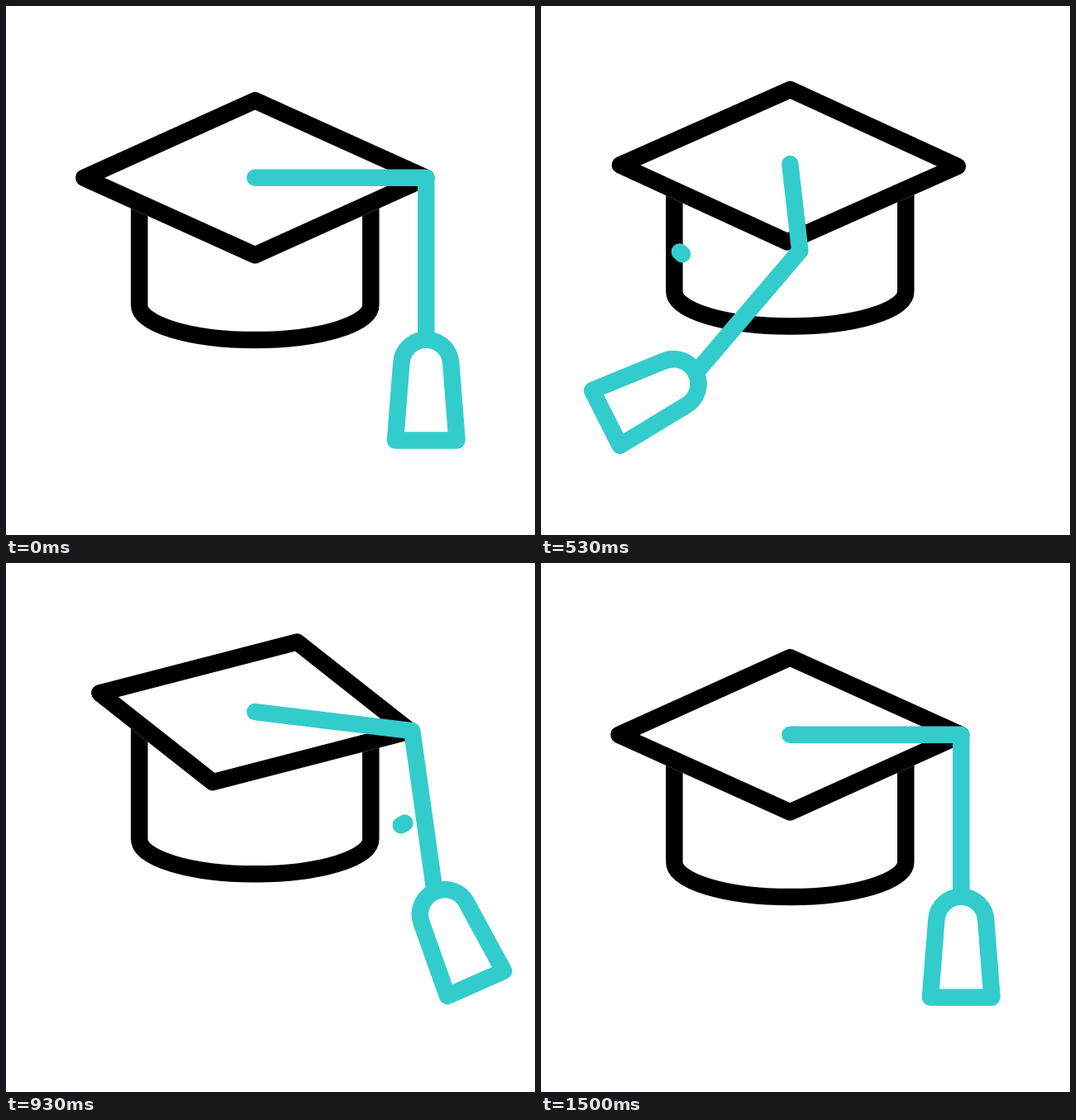
An HTML page with a canvas for the animation above (1670 ms loop, 640x640 px).

```html
<!DOCTYPE html>
<html lang="en">
<head>
<meta charset="utf-8">
<title>Graduation cap</title>
<style>
  html, body { margin: 0; height: 100%; overflow: hidden; background: #fff; }
  canvas { display: block; width: 640px; height: 640px; }
</style>
</head>
<body>
<canvas id="stage" width="640" height="640"></canvas>
<script>
const ctx = document.getElementById('stage').getContext('2d');
const LOOP = 1670, FPS = 30, RAD = Math.PI / 180;
const TEAL = '#33cccc', CX = 301.3, CY = 207.8, RX = 207, RY = 93.5;

// Key times in ticks of 1/30 s, shared by all swinging parts
const TIMES = [0, 5, 11, 16, 23, 28, 32];
const TRACKS = {
  cos:    [1, .83, .384, -.008, .63, .907, 1],
  sin:    [0, .353, .86, .986, .735, .246, 0],
  shift:  [0, 0, 1.2, 2, .8, .3, 0],
  hookX:  [207, 184, 78, 12, 137, 190, 207],
  hookY:  [0, 26, 91, 105, 71, 23, 0],
  reach:  [196, 197, 200.9, 194, 197.5, 196.5, 196],
  rope:   [0, 4.8, -22.1, -40.5, -5.5, 8, 0],
  tassel: [0, 22.6, -6.9, -63.3, -17.3, 24, 0]
};
// Bounce of the whole cap: [tick, offset]
const BOUNCE = [[0, 0], [8.8, -54.5], [20, -1], [32.3, -38.2], [45, 0]];

const smooth = (a, b, t) => {
  const x = Math.min(1, Math.max(0, (t - a) / (b - a)));
  return x * x * (3 - 2 * x);
};

const bounce = t => BOUNCE.slice(1).reduce(
  (y, [end, to], i) => y + (to - BOUNCE[i][1]) * smooth(BOUNCE[i][0], end, t), 0);

// Cubic Hermite curve, at rest at both ends and at the turning point
function sample(values, t) {
  const last = TIMES.length - 1;
  if (t >= TIMES[last]) return values[last];
  const i = TIMES.findIndex(k => k > t) - 1;
  const slope = j => j % 3 === 0 ? 0
    : (values[j + 1] - values[j - 1]) / (TIMES[j + 1] - TIMES[j - 1]);
  const h = TIMES[i + 1] - TIMES[i], s = (t - TIMES[i]) / h, r = 1 - s;
  return values[i] * r * r * (1 + 2 * s) + values[i + 1] * s * s * (3 - 2 * s)
    + h * s * r * (slope(i) * r - slope(i + 1) * s);
}

function polyline(points, closed) {
  ctx.beginPath();
  points.forEach(([x, y]) => ctx.lineTo(x, y));
  if (closed) ctx.closePath();
}

function stroke(color, cap = 'round') {
  ctx.strokeStyle = color;
  ctx.lineCap = cap;
  ctx.stroke();
}

function drawBody() {
  ctx.beginPath();
  ctx.moveTo(CX - 140, 212);
  ctx.lineTo(CX - 140, 362);
  ctx.ellipse(CX, 362, 140, 42, 0, Math.PI, 0, true);
  ctx.lineTo(CX + 140, 212);
  stroke('#000', 'butt');
}

function drawBoard({ cos, sin, shift }) {
  const corner = (x, y) => [CX - shift * .75 + RX * x, CY + shift + RY * y];
  polyline([corner(cos, sin), corner(-sin, cos), corner(-cos, -sin), corner(sin, -cos)], true);
  ctx.fillStyle = '#fff';
  ctx.fill();
  stroke('#fff');
  stroke('#000');
}

function drawTassel({ hookX, hookY, reach, rope, tassel }) {
  const x = CX + hookX, y = CY + hookY;
  const endX = x + reach * Math.sin(rope * RAD), endY = y + reach * Math.cos(rope * RAD);
  polyline([[CX, CY], [x, y], [endX, endY]]);
  stroke(TEAL);
  ctx.save();
  ctx.translate(endX, endY);
  ctx.rotate(-tassel * RAD);
  ctx.beginPath();
  ctx.arc(0, 30, 30, Math.PI * 1.02, -Math.PI * .02);
  ctx.lineTo(37.3, 121.6);
  ctx.lineTo(-37.3, 121.6);
  ctx.closePath();
  stroke(TEAL);
  ctx.restore();
}

// Speed line running along an ellipse from one angle to another
function drawSwoosh(x, y, rx, ry, from, to, tail, head) {
  if (head <= 0 || tail >= 1) return;
  const angle = p => (from + (to - from) * p) * RAD;
  ctx.beginPath();
  ctx.ellipse(x, y, rx, ry, 0, angle(tail), angle(head), to < from);
  stroke(TEAL);
}

function draw(t) {
  const pose = {};
  for (const name in TRACKS) pose[name] = sample(TRACKS[name], t);
  ctx.fillStyle = '#fff';
  ctx.fillRect(0, 0, 640, 640);
  ctx.lineWidth = 20.5;
  ctx.lineJoin = 'round';
  ctx.save();
  ctx.translate(0, bounce(t));
  drawBody();
  drawBoard(pose);
  drawTassel(pose);
  ctx.restore();
  drawSwoosh(301, 219.8, 195, 90, 37.5, 153.7, smooth(5, 14.5, t), smooth(.4, 10.5, t));
  drawSwoosh(337, 255.5, 190, 92, 152.9, 40, smooth(18, 28.9, t), smooth(15, 27.8, t));
}

function tick() {
  const ms = performance.now() % LOOP;
  draw(Math.floor((ms + 5) * FPS / 1000));
  requestAnimationFrame(tick);
}
tick();
</script>
</body>
</html>
```
